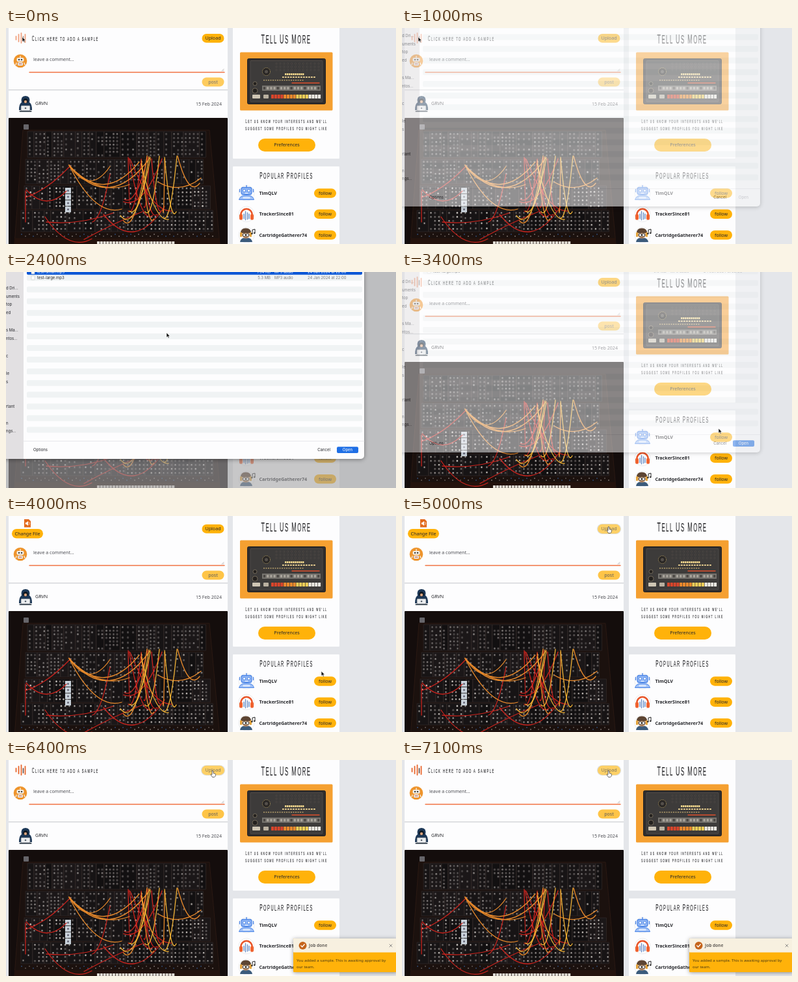
These frames come from a looping animation (600x334 px, 7200 ms). An HTML page:

```html
<!DOCTYPE html>
<html lang="en">
<head>
<meta charset="utf-8">
<title>Adding a sample</title>
<style>
  html, body { margin: 0; height: 100%; overflow: hidden; background: #e4e6ea; }
  svg { display: block; width: 100vw; height: 100vh; }
  text { font-family: "Noto Sans", sans-serif; white-space: pre; }
  .hand { font-family: "Liberation Sans", sans-serif; letter-spacing: 3.6px; stroke: #2b2b2e; stroke-width: .2px; }
  .mac text { font-family: Inter, sans-serif; }
  #sheet > rect:first-child, .shadow { filter: drop-shadow(0 1px 3px #0006); }
</style>
</head>
<body>
<svg id="stage" viewBox="0 0 600 334"></svg>
<script>
const AMBER = '#ffb20a', INK = '#25262a', CARD = '#fdfdfe';

let seed = 11;
const random = () => (seed = seed * 16807 % 2147483647) / 2147483647;
const between = (a, b) => a + (b - a) * random();
const pick = list => list[Math.floor(random() * list.length)];
const repeat = (n, draw) => Array.from({ length: n }, (_, i) => draw(i)).join('');

const rect = (x, y, w, h, fill, r = 0, more = '') =>
  `<rect x="${x}" y="${y}" width="${w}" height="${h}" rx="${r}" fill="${fill}" ${more}/>`;
const circle = (x, y, r, fill, more = '') => `<circle cx="${x}" cy="${y}" r="${r}" fill="${fill}" ${more}/>`;
const shape = (d, fill, more = '') => `<path d="${d}" fill="${fill}" ${more}/>`;
const line = (d, stroke, width = 1) =>
  `<path d="${d}" fill="none" stroke="${stroke}" stroke-width="${width}" stroke-linecap="round"/>`;
// y is the middle of the line of text
const text = (x, y, str, { size = 7.1, fill = INK, anchor = 'start', weight = 400 } = {}) =>
  `<text x="${x}" y="${y + size * .35}" font-size="${size}" fill="${fill}" text-anchor="${anchor}" font-weight="${weight}">${str}</text>`;
const group = (id, ...parts) => `<g id="${id}">${parts.join('')}</g>`;
const at = (x, y, ...parts) => `<g transform="translate(${x} ${y})">${parts.join('')}</g>`;
const button = (x, y, w, h, label) =>
  rect(x, y, w, h, AMBER, h / 2) + text(x + w / 2, y + h / 2, label, { anchor: 'middle' });

// Narrow hand lettering: tall initials, slightly lower capitals for the rest
function lettering(x, y, size, str, anchor = 'middle') {
  const spans = str.replace(/[^A-Z]+/g, s => `<tspan font-size="${size * .88}">${s.toUpperCase()}</tspan>`);
  return `<text class="hand" transform="translate(${x} ${y}) scale(.42 1)" font-size="${size}" fill="#2b2b2e"
    text-anchor="${anchor}">${spans}</text>`;
}

function robotAvatar() {
  return circle(0, 0, 10.3, '#ee942c') + rect(-5.5, -5, 11, 6, '#f4f1ea', 2) + rect(-4, 2, 8, 5, '#e6e8ea', 1.5)
    + circle(-2, -2, 1.3, '#46443f') + circle(2, -2, 1.3, '#46443f')
    + line('M0 -5V-7.5M-6 3l-1 3M6 3l1 3', '#f4f1ea', 1.3) + line('M-2 4.5h4', '#d0522a');
}
function hoodAvatar() {
  return shape('M-10 10Q-10 0-6 -2Q-8 -12 0 -12Q8 -12 6 -2Q10 0 10 10z', '#1d3857')
    + shape('M-4 -3Q-4 -8 0 -8Q4 -8 4 -3Q0 2-4 -3z', '#101820') + circle(0, -3, 2.2, '#d7a27e')
    + rect(-7, 3, 14, 8, '#eceef0', 1, 'stroke="#59636d" stroke-width=".7"') + circle(0, 7, 1.3, '#59636d')
    + rect(-9.5, 11, 19, 1.8, '#39444f', .8);
}
const avatarRing = circle(0, 0, 12, '#fff', 'stroke="#e6e7ea" stroke-width=".8"');
function blueRobot() {
  const blue = '#4d86e6';
  return avatarRing + rect(-8, -9, 16, 11, '#8fb5f5', 3, `stroke="${blue}" stroke-width="1.3"`)
    + circle(-3.5, -4, 2, '#fff', `stroke="${blue}"`) + circle(3.5, -4, 2, '#fff', `stroke="${blue}"`)
    + line('M-2 0h4', '#fff') + line('M0 -9v-3M-10.500 -6v4M10.500 -6v4', blue, 1.4)
    + shape('M-11.500 10Q-10 3 0 3Q10 3 11.500 10z', '#9dbff7', `stroke="${blue}"`) + line('M-5 7h10', '#fff', 1.3);
}
function headphones() {
  return avatarRing + line('M-9 2A9 10 0 0 1 9 2', '#e8562a', 2.6)
    + rect(-11, 0, 5, 9, '#f0622f', 2) + rect(6, 0, 5, 9, '#f0622f', 2)
    + line('M-4 0v7M-1.5 -4v13M1.5 -2v10M4 0v7', '#6f93c9', 1.5);
}
function listener() {
  return avatarRing + shape('M-10 11Q-9 4-1 4Q8 4 9 11z', '#3b5b7c') + circle(-1, -1, 6.5, '#e9b98c')
    + shape('M-9 -3Q-9 -10.500 -1 -10.500Q7 -10.500 7 -3z', '#5d4533') + rect(-10, -4, 3, 7, '#e1a23a', 1) + rect(5, -4, 3, 7, '#e1a23a', 1)
    + circle(-3.5, 0, 2.3, '#fff', 'stroke="#222"') + circle(1.5, 0, 2.3, '#fff', 'stroke="#222"')
    + line('M-3 4h4', '#573525') + line('M9 -2v-6l4 -1v6', '#222') + circle(8.2, -2, 1.2, '#222') + circle(12.2, -3, 1.2, '#222');
}

function panelRow(y, h, left, right, glow) {
  let out = '';
  for (let x = left; x < right - 8;) {
    const w = Math.min(pick([10, 12, 18, 25]), right - x), step = pick([5.5, 6.2, 8]);
    out += rect(x, y, w - .6, h, pick(['#171415', '#1b1718', '#121011']), 0, 'stroke="#3a3230" stroke-width=".5"');
    for (let ky = y + 4; ky < y + h - 2; ky += step)
      for (let kx = x + 3.5; kx < x + w - 2; kx += step) {
        if (random() < .15) continue;
        out += circle(kx, ky, 1.9, '#373334') + circle(kx, ky - .2, between(.6, 1.2), pick(['#ded9d3', '#b3ada8', '#7d7672']), `opacity="${glow}"`);
      }
    x += w;
  }
  return out;
}
const cable = (x1, y1, x2, y2, sag, color) =>
  line(`M${x1} ${y1}Q${(x1 + x2) / 2} ${Math.max(y1, y2) + sag} ${x2} ${y2}`, color, 1.3);
const cables = (color, list) => list.map(ends => cable(...ends, color)).join('');
const hanging = (n, color) =>
  repeat(n, () => cable(between(188, 262), between(197, 212), between(178, 255), between(262, 298), between(-5, 25), color));

function synth() {
  return rect(4, 139, 337, 205, '#140d0c', 1)
    + shape('M26 158H313L329 334H13z', '#1b110e', 'stroke="#2a1913"')
    + rect(27, 149, 8, 8, '#66656a', 1)
    + panelRow(160, 40, 33, 308, .5) + panelRow(203, 38, 30, 311, .65)
    + panelRow(244, 36, 28, 315, .95) + panelRow(282, 33, 23, 320, .9)
    + repeat(50, i => circle(24 + i * 6, 319 + i % 2 * 3, .8, pick(['#b6aea8', '#3b6fb0', '#8d857f'])))
    + rect(13, 325, 316, 10, '#24130d') + repeat(25, i => rect(140 + i * 4.8, 330, 4, 14, '#e2ded6'))
    + repeat(4, i => rect(91, 247 + i * 9.7, 9, 8.8, '#c9d2da') + circle(95.5, 251.4 + i * 9.7, 1.5, '#667'))
    + hanging(7, '#c9231d')
    + cables('#c9231d', [[99, 213, 30, 262, -12], [30, 252, 30, 300, -5], [31, 250, 93, 252, 32], [62, 300, 165, 286, 5],
        [60, 292, 132, 326, 20], [120, 327, 210, 284, -25], [188, 200, 191, 278, 0], [218, 200, 182, 265, 10],
        [160, 226, 133, 300, -5], [150, 288, 244, 276, 60]])
    + cables('#e98a2b', [[97, 212, 160, 214, 46], [97, 212, 205, 207, 62], [97, 212, 222, 200, 75], [98, 214, 190, 242, 18],
        [98, 214, 178, 280, 12], [264, 198, 298, 240, 22], [234, 238, 300, 232, 20]])
    + hanging(3, '#e98a2b')
    + cables('#eeb035', [[220, 199, 190, 283, 12], [236, 198, 214, 284, 15], [244, 200, 262, 284, 20],
        [263, 198, 243, 294, 5], [208, 210, 250, 296, 4], [222, 202, 176, 290, 30]]);
}

function drumMachine() {
  const pads = ['#d9452b', '#ef8a2c', '#f3cf58', '#efece4'];
  return rect(360, 37.5, 142.5, 90, '#f5a031', 1.5)
    + rect(371.5, 47.5, 120, 70, '#2f2d2d', 2, 'stroke="#232121"') + rect(376, 50.5, 111, 63.5, '#3d3b3a', 1, 'stroke="#66615c" stroke-width=".5"')
    + circle(400.5, 67.5, 6, '#2a2725', 'stroke="#c9b06c" stroke-width="1" stroke-dasharray="1 1.4"') + circle(400.5, 67.5, 2.5, '#55504b')
    + repeat(36, i => circle(416 + i % 12 * 5.9, 55 + Math.floor(i / 12) * 5, 1, '#242221', 'stroke="#77706a" stroke-width=".4"'))
    + repeat(10, i => rect(429 + i * 3, 70, 2.4, 3, '#ecd28a')) + repeat(13, i => rect(425 + i * 4, 75, 2.8, 2, '#e0c88c'))
    + repeat(18, i => rect(396 + i * 3.5, 80, 2, 1.4, '#b9a26c'))
    + circle(383, 86, 3, '#24211f', 'stroke="#9b8c75" stroke-width=".6"') + circle(383, 97, 4, '#24211f', 'stroke="#9b8c75" stroke-width=".6"')
    + line('M440 85H482', '#dd4d2d', 1.4)
    + rect(394, 89, 90, 8, '#77746f') + repeat(17, i => rect(396 + i * 5.2, 91, 3, 4, i % 4 ? '#aaa59c' : '#4b4744'))
    + rect(379, 103, 12, 6, '#cfc6b4', 1) + rect(396, 103, 8, 6, '#b9b0a0', 1)
    + repeat(16, i => rect(408 + i * 4.8, 103, 4.1, 6, pads[i >> 2], .5));
}

const profiles = [['TimQLV', blueRobot], ['TrackerSince81', headphones], ['CartridgeGatherer74', listener]];
const sidebar = [['d Dri...', 25], ['uments', 38], ['top', 50], ['ed', 63], ['s Ma...', 90], ['ntos...', 103],
  ['c', 130], ['le', 157], ['s', 170], ['rtant', 208], ['n', 234], ['ngs...', 246]];

function fileRow(y, name, size, fill, soft) {
  const faint = { size: 6, fill: soft };
  return rect(39, y - 3, 5, 6, '#fff', .5, 'stroke="#bbb" stroke-width=".5"') + text(48, y, name, { size: 6, fill })
    + text(407, y, size, { ...faint, anchor: 'end' }) + text(413, y, 'MP3 audio', { ...faint, size: 5.7 })
    + text(464, y, '24 Jan 2024 at 22:00', { ...faint, size: 5.8 });
}

document.getElementById('stage').innerHTML = [
  rect(0, 0, 600, 334, '#e4e6ea'),
  rect(4, 0, 337, 334, CARD),
  group('prompt',
    group('wave', line('M15.5 13v5M19.5 10v11M23.5 8v15M29.5 10v12', '#e8652c', 1.8), line('M26.5 13v7', '#4a3a33', 1.4)),
    lettering(40, 19.7, 11.3, 'Click here to add a sample', 'start')),
  group('chosen',
    shape('M28 5h7l3 3v9.5h-10z', '#e2691c'), shape('M30 10h1.5l2.5 -2v7l-2.500 -2H30z', '#fff'), line('M35.500 9.500q1.500 2 0 4', '#fff', .8),
    button(9, 20, 48, 14.5, 'Change File')),
  group('upload',
    group('uploadButton', button(301.5, 9, 34, 13.8, 'Upload')),
    group('uploadHover', rect(300, 8, 37, 16, '#dcdfe0', 8),
      rect(301, 8.8, 35, 14.4, '#fdd066', 7.2), text(318.5, 16, 'Upload', { anchor: 'middle', fill: '#7d7660' }))),
  group('lower',
    at(22, 51, robotAvatar()), text(42, 49, 'leave a comment...', { fill: '#4c4d52' }),
    line('M36 68.500H336', '#f0703f', 1.4), line('M332 66.500l3 -3M334 66.500l1 -1', '#777', .5),
    group('post', button(301.5, 76.5, 34, 14, 'post')),
    rect(4, 95, 337, 1.4, '#d3d4d8'),
    at(30, 117, hoodAvatar()), text(45, 117, 'GRVN', { weight: 500 }),
    text(332, 118, '15 Feb 2024', { anchor: 'end', fill: '#4c4d52' }),
    synth()),
  rect(349, -4, 164, 206, CARD, 1),
  lettering(431, 23.5, 21, 'Tell Us More'),
  drumMachine(),
  lettering(431.5, 147, 9, 'Let us know your interests and we\'ll'),
  lettering(431.5, 158, 9, 'suggest some profiles you might like'),
  button(388, 171, 88, 20, 'Preferences'),
  rect(349, 214, 164, 130, CARD, 1),
  lettering(431.5, 232.5, 15.5, 'Popular Profiles'),
  ...profiles.map(([name, avatar], i) => at(370, 255.5 + i * 32.3, avatar(),
    text(19.5, 0, name, { weight: 700 }), button(104, -7.2, 34, 14.4, 'follow'))),
  group('toast', rect(442, 276, 160, 52, AMBER, 1, 'class="shadow"'), rect(442, 276, 160, 21.5, '#f7f0e0', 1),
    circle(456.5, 287, 6, '#c5641b'), line('M453.700 287l2 2 3.500 -4', '#fff', 1.3),
    text(466, 287, 'Job done', { size: 6.5, weight: 600, fill: '#67635d' }), line('M590 285l4 4M594 285l-4 4', '#777', .8),
    text(447, 310, 'You added a sample. This is awaiting approval by', { size: 6, fill: '#4b3a12' }),
    text(447, 319.5, 'our team.', { size: 6, fill: '#4b3a12' })),
  rect(0, 0, 600, 334, '#a3a3a6', 0, 'id="dim"'),
  '<g class="mac">' + group('sheet',
    rect(-20, -40, 571, 329, CARD, 5), rect(-20, -40, 47, 329, '#e2e0e2'),
    ...sidebar.map(([label, y]) => text(0, y, label, { size: 6 })),
    repeat(14, i => rect(32, 4.5 + i * 18.08, 516, 9, '#f0f3f4', 2)),
    line('M27 261.500H551', '#e3e3e6', .8),
    group('unselected', fileRow(0, 'test-small.mp3', '754 KB', INK, '#77787c')),
    group('selected', rect(32, -5, 516, 9.2, '#0a57d6', 2), fileRow(0, 'test-small.mp3', '754 KB', '#fff', '#fff')),
    fileRow(9, 'test-large.mp3', '5.3 MB', INK, '#77787c'),
    text(53, 275, 'Options', { size: 6, anchor: 'middle' }), text(489, 275, 'Cancel', { size: 6, anchor: 'middle' }),
    group('openOff', text(525.5, 275, 'Open', { size: 6, anchor: 'middle', fill: '#b5b5b8' })),
    group('openOn', rect(509, 270.3, 33, 9.6, '#1f6fe5', 2), text(525.5, 275, 'Open', { size: 6, anchor: 'middle', fill: '#fff' }))) + '</g>',
  group('cursor',
    group('arrow', shape('M0 0v7.200l1.700 -1.600 1.200 2.700 1.200 -.5 -1.200 -2.600h2.300z', '#111', 'stroke="#fff" stroke-width=".5"')),
    group('pointer', shape('M-1 0Q0 -1 1 0V3.500Q4.500 3.500 4.500 5.500Q4.500 9 2.500 9.500H-.5L-3 5.500Q-3 4.500-1 5.500z', '#fff', 'stroke="#333" stroke-width=".7"')))
].join('');

const el = id => document.getElementById(id);
const show = (id, on) => el(id).style.display = on ? '' : 'none';
const fade = (id, a) => el(id).setAttribute('opacity', a);
const move = (id, x, y) => el(id).setAttribute('transform', `translate(${x} ${y})`);
const ramp = (t, from, to) => Math.min(1, Math.max(0, (t - from) / (to - from)));

// time, x, y
const cursorPath = [[0, 25, 14], [1200, 25, 14], [1700, 190, 0], [2100, 190, 0], [2400, 247, 94], [2900, 520, 272],
  [3200, 520, 272], [3400, 487, 242], [4100, 485, 240], [4700, 318, 17], [7200, 318, 17]];
function cursorAt(t) {
  const i = cursorPath.findIndex(key => key[0] > t);
  const [t0, x0, y0] = cursorPath[i - 1], [t1, x1, y1] = cursorPath[i];
  const u = ramp(t, t0, t1), k = u * u * (3 - 2 * u);
  return [x0 + (x1 - x0) * k, y0 + (y1 - y0) * k];
}

function render(time) {
  const t = Math.floor(time % 7200 / 100) * 100;
  const chosen = t >= 3700 && t < 6200, hover = t >= 4600, selected = t >= 1900;
  show('prompt', !chosen);
  show('chosen', chosen);
  fade('wave', t < 3700 ? .6 : 1);
  move('lower', 0, chosen ? 8 : 0);
  move('upload', 0, chosen ? 4 : 0);
  show('uploadHover', hover);
  show('uploadButton', !hover);
  fade('post', t < 3700 ? .65 : .75);

  const closing = t >= 3300;
  const alpha = closing ? 1 - ramp(t, 3200, 3600) : ramp(t, 860, 1120);
  show('sheet', alpha > 0);
  fade('sheet', alpha);
  move('sheet', 0, closing ? -(t - 3200) / 20 : -26 * (1 - ramp(t, 800, 1200)));
  fade('dim', .6 * ramp(t, 1000, 1300) * (1 - ramp(t, 3100, 3300)));
  show('selected', selected);
  show('unselected', !selected);
  show('openOn', selected);
  show('openOff', !selected);

  const arrived = ramp(t, 6100, 6400);
  show('toast', arrived > 0);
  fade('toast', arrived);

  const [x, y] = cursorAt(t);
  move('cursor', x, y);
  show('arrow', !hover);
  show('pointer', hover);
}
const start = performance.now();
(function tick() {
  render(performance.now() - start);
  requestAnimationFrame(tick);
})();
</script>
</body>
</html>
```
